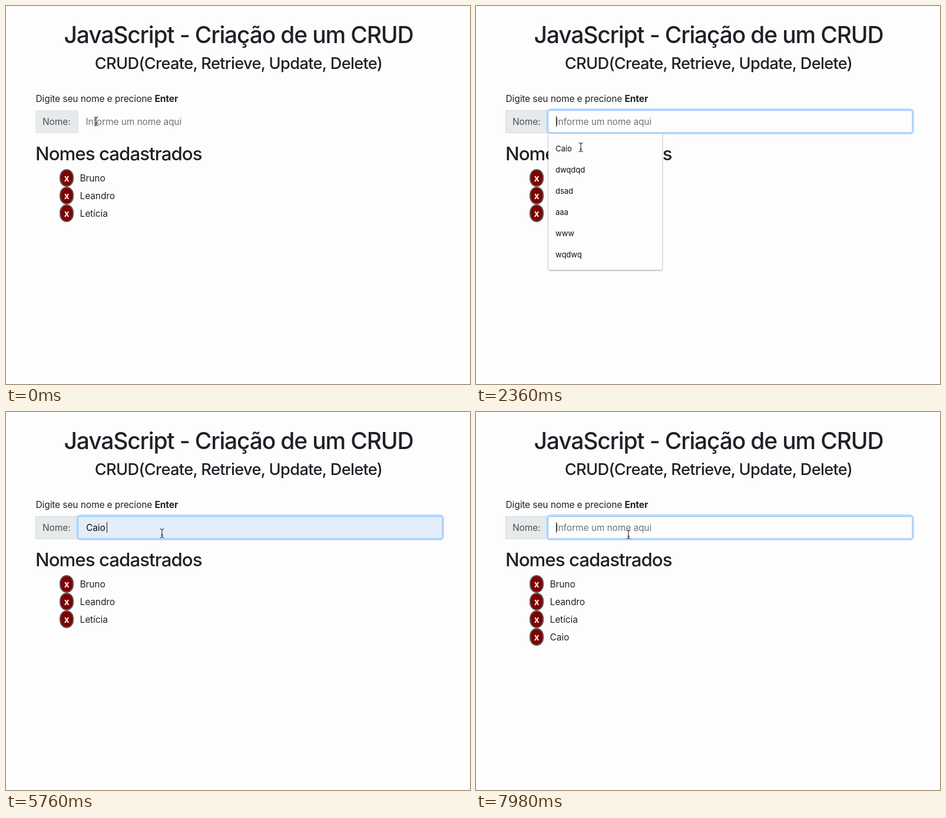
These frames come from a looping animation (788x642 px, 8 s). An HTML page:

```html
<!DOCTYPE html>
<html lang="pt-BR">
<head>
<meta charset="utf-8">
<title>JavaScript - Criação de um CRUD</title>
<style>
  html, body { margin: 0; width: 100%; height: 100%; overflow: hidden; background: #fdfdfd; }
  svg { display: block; width: 788px; height: 642px; }
  text {
    font: 15.5px Inter, "Open Sans", sans-serif;
    font-optical-sizing: none;
    letter-spacing: -.1px;
    fill: #1e2126;
  }
  .heading { font-weight: 500; letter-spacing: -.03em; }
  .title { font-size: 39px; text-anchor: middle; }
  .subtitle { font-size: 27.2px; letter-spacing: -.024em; text-anchor: middle; }
  .section { font-size: 31.2px; }
  .bold { font-weight: 700; }
  .label { fill: #495057; }
  .hint { fill: #6c757d; }
  .typed { fill: #0a0a0c; }
  .cross { font-weight: 700; font-size: 15px; fill: #fff; text-anchor: middle; }
  .option { font-size: 13px; letter-spacing: 0; fill: #101012; }
  .menu { filter: drop-shadow(0 1px 1.5px rgba(50, 50, 50, .5)); }
</style>
</head>
<body>
<svg viewBox="0 0 788 642">
  <rect width="788" height="642" fill="#fdfdfd"/>
  <text class="heading title" x="395" y="63">JavaScript - Criação de um CRUD</text>
  <text class="heading subtitle" x="395" y="107">CRUD(Create, Retrieve, Update, Delete)</text>
  <text x="50.5" y="163">Digite seu nome e precione <tspan class="bold">Enter</tspan></text>

  <rect id="labelBox" x="50.5" y="177.5" width="72" height="38"/>
  <text class="label" x="62" y="202">Nome:</text>
  <g id="focus">
    <rect x="120.5" y="175.5" width="622" height="41" rx="5" fill="none" stroke="#bfdcfa" stroke-width="3"/>
    <rect id="field" x="122.5" y="177.5" width="618.5" height="37.5" rx="3" stroke="#86bef5"/>
  </g>
  <text id="hint" class="hint" x="135.5" y="202">Informe um nome aqui</text>
  <text id="typed" class="typed" x="136" y="202">Caio</text>
  <rect id="caret" y="187" width="1" height="18" fill="#111"/>

  <text class="heading section" x="50" y="262">Nomes cadastrados</text>
  <g id="list"></g>
  <g id="menu">
    <rect class="menu" x="123" y="217" width="193" height="231" rx="2" fill="#fdfdfd"/>
  </g>
  <g id="pointer" fill="none">
    <path id="beamHalo" stroke="#fff" stroke-opacity=".6" stroke-width="2.2"/>
    <path id="beam" stroke="#111" stroke-width="1"/>
  </g>
</svg>
<script>
const LOOP = 8000;
const FOCUS = 300, MENU_OPEN = 650, PICK = 2950, SUBMIT = 7640;
const names = ["Bruno", "Leandro", "Letícia", "Caio"];
const options = ["Caio", "dwqdqd", "dsad", "aaa", "www", "wqdwq"];

// time, x, y
const pointerPath = [
  [0, 153, 196], [1700, 153, 196], [2300, 178, 240], [2950, 178, 240],
  [3500, 181, 209], [3700, 181, 209], [4300, 204, 195], [4700, 204, 195],
  [5700, 265, 206], [5900, 265, 206], [6500, 259, 208], [LOOP, 259, 208]
];

const $ = id => document.getElementById(id);

function add(parent, tag, attrs, text = "") {
  const el = document.createElementNS("http://www.w3.org/2000/svg", tag);
  for (const key in attrs) el.setAttribute(key, attrs[key]);
  el.textContent = text;
  return parent.appendChild(el);
}

const rows = names.map((name, i) => {
  const row = add($("list"), "g", { transform: `translate(0 ${i * 30})` });
  add(row, "rect", {
    x: 92, y: 278, width: 22, height: 28, rx: 11, ry: 12.5,
    fill: "#800000", stroke: "#5f5557", "stroke-width": 2
  });
  add(row, "text", { class: "cross", x: 103, y: 297.5 }, "x");
  add(row, "text", { x: 125.5, y: 298 }, name);
  return row;
});

options.forEach((word, i) =>
  add($("menu"), "text", { class: "option", x: 135, y: 247 + i * 36 }, word));

const beamShape = "M-3.5-7.5Q0-7.5 0-5.5Q0-7.5 3.5-7.5M0-6V6M-3.5 7.5Q0 7.5 0 5.5Q0 7.5 3.5 7.5M-2 3H2";
$("beam").setAttribute("d", beamShape);
$("beamHalo").setAttribute("d", beamShape);

function pointerAt(t) {
  const next = Math.max(1, pointerPath.findIndex(p => p[0] > t));
  const [t0, x0, y0] = pointerPath[next - 1];
  const [t1, x1, y1] = pointerPath[next];
  const u = (t - t0) / (t1 - t0);
  const ease = u * u * (3 - 2 * u);
  return [x0 + (x1 - x0) * ease, y0 + (y1 - y0) * ease];
}

const show = (el, visible) => el.style.display = visible ? "" : "none";

function draw(t) {
  const filled = t >= PICK && t < SUBMIT;
  const blinkStart = t >= SUBMIT ? SUBMIT : FOCUS;
  const blinkOn = t >= FOCUS && (t - blinkStart) % 1000 < 500;

  $("focus").style.opacity = Math.min(1, Math.max(0, (t - FOCUS) / 150));
  $("field").setAttribute("fill", filled ? "#e4eefb" : "#fdfdfd");
  $("labelBox").setAttribute("fill", "#e6eaea");
  $("labelBox").setAttribute("stroke", t < FOCUS ? "#e6eaea" : "#d3d9dc");
  show($("hint"), !filled);
  show($("typed"), filled);
  show($("caret"), blinkOn);
  $("caret").setAttribute("x", filled ? 171 : 136);
  show($("menu"), t >= MENU_OPEN && t < PICK);
  show(rows[3], t >= SUBMIT);
  $("pointer").setAttribute("transform", `translate(${pointerAt(t)})`);
}

function tick() {
  draw(performance.now() % LOOP);
  requestAnimationFrame(tick);
}
tick();
</script>
</body>
</html>
```
